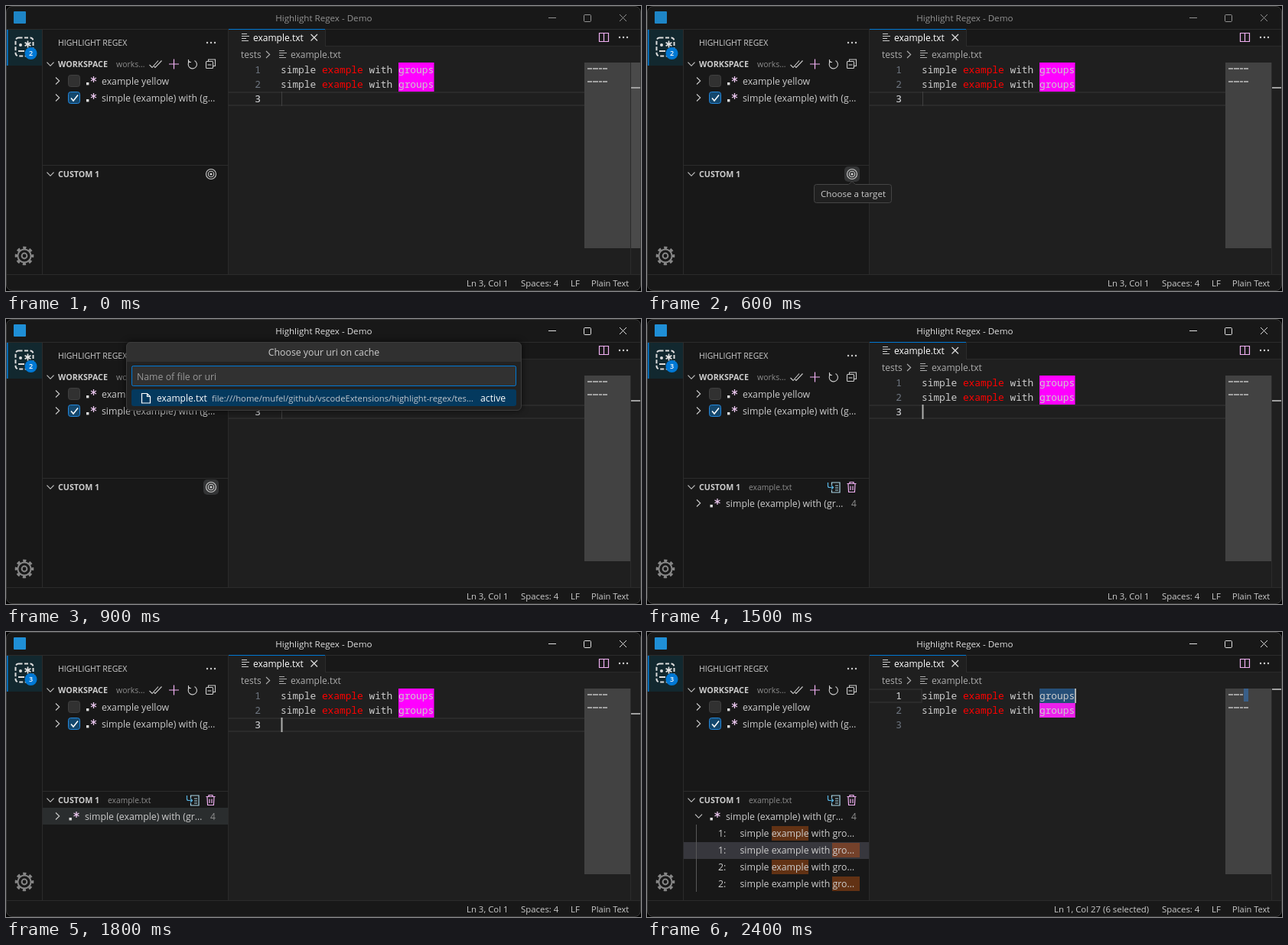
An HTML page that plays this animation: 830x373 px, repeating every 2.7 s.

```html
<!DOCTYPE html>
<html lang="en">
<head>
<meta charset="utf-8">
<title>Highlight Regex - Demo</title>
<style>
html, body { margin: 0; width: 100%; height: 100%; overflow: hidden; background: #000; }
svg { display: block; width: 830px; height: 373px; }
text { font: 12.3px "Open Sans", "Noto Sans", sans-serif; fill: #ccc; }
.head { font-size: 10.7px; font-weight: 700; }
.note { font-size: 10.5px; fill: #8c8c8c; }
.tab { font-size: 12px; }
.bar { font-size: 11.4px; }
.code text { font: 12.83px "Noto Sans Mono", "DejaVu Sans Mono", monospace; }
.code .num { fill: #6e7681; text-anchor: end; }
.code .now { fill: #ccc; text-anchor: end; }
.code tspan { fill: #f00; }
.white { fill: #fff; }
.line { fill: none; stroke: #ccc; stroke-width: 1.1; }
.edge { fill: none; stroke: #2b2b2b; }
.pink { fill: none; stroke: #f0b0f2; stroke-width: 1.2; }
.mark { fill: #623214; }
.map { fill: none; stroke: #a2a2a2; stroke-width: 2; stroke-dasharray: 6 1 7 1 4 1 6 1; }

/* vAB is visible from step A to step B; nine steps of 300 ms */
[class^=v] { visibility: hidden; animation: 2.7s step-end infinite; }
.v01 { animation-name: v01 } .v04 { animation-name: v04 } .v07 { animation-name: v07 }
.v13 { animation-name: v13 } .v22 { animation-name: v22 } .v33 { animation-name: v33 }
.v34 { animation-name: v34 } .v44 { animation-name: v44 } .v56 { animation-name: v56 }
.v58 { animation-name: v58 } .v66 { animation-name: v66 } .v77 { animation-name: v77 }
.v78 { animation-name: v78 } .v88 { animation-name: v88 }
@keyframes v01 { 0% { visibility: visible } 22.2222% { visibility: hidden } }
@keyframes v04 { 0% { visibility: visible } 55.5555% { visibility: hidden } }
@keyframes v07 { 0% { visibility: visible } 88.8888% { visibility: hidden } }
@keyframes v13 { 11.1111% { visibility: visible } 44.4444% { visibility: hidden } }
@keyframes v22 { 22.2222% { visibility: visible } 33.3333% { visibility: hidden } }
@keyframes v33 { 33.3333% { visibility: visible } 44.4444% { visibility: hidden } }
@keyframes v34 { 33.3333% { visibility: visible } 55.5555% { visibility: hidden } }
@keyframes v44 { 44.4444% { visibility: visible } 55.5555% { visibility: hidden } }
@keyframes v56 { 55.5555% { visibility: visible } 77.7777% { visibility: hidden } }
@keyframes v58 { 55.5555%, 100% { visibility: visible } }
@keyframes v66 { 66.6666% { visibility: visible } 77.7777% { visibility: hidden } }
@keyframes v77 { 77.7777% { visibility: visible } 88.8888% { visibility: hidden } }
@keyframes v78 { 77.7777%, 100% { visibility: visible } }
@keyframes v88 { 88.8888%, 100% { visibility: visible } }

.caption { color: #ddd; animation: focus 2.7s step-end infinite; }
.caption text { font-size: 11.6px; fill: currentColor; text-anchor: middle; }
@keyframes focus { 0% { color: #9d9d9d; opacity: .92 } 33.3333%, 100% { color: #e0e0e0; opacity: 1 } }
.dialog { filter: drop-shadow(0 0 4px #000a); }
</style>
</head>
<body>
<svg viewBox="0 0 830 373">
<defs>
  <path id="right" class="line" d="M-2.5-4.5 2.2 0-2.5 4.5"/>
  <path id="down" class="line" d="M-4.5-2.3 0 2.3 4.5-2.3"/>
  <g id="regex">
    <path fill="#ddd" d="M-7 2h3.4v3.4h-3.4z"/>
    <path d="M2.5-6v8M-1-4 6 0M-1 0 6-4" fill="none" stroke="#ecc8f0" stroke-width="1.3"/>
  </g>
  <path id="lines" class="line" d="M0 .5h7M0 3.5h10M0 6.5h6M0 9.5h9"/>
  <g id="dots" fill="#ccc"><circle cx="-5" r="1.2"/><circle r="1.2"/><circle cx="5" r="1.2"/></g>
</defs>

<!-- window -->
<rect x=".5" y=".5" width="829" height="372" rx="7.5" fill="#181818"/>
<path d="M291 52H829V351H291z" fill="#1f1f1f"/>
<path class="edge" d="M1 30.5H829M47.5 30V351M290.5 30V351M1 351.5H829M291 52.5H829M48 208.5H290"/>

<g class="caption">
  <rect x="10" y="7" width="16" height="16" rx="1" fill="#1f8fd6"/>
  <text x="415.3" y="20">Highlight Regex - Demo</text>
  <path d="M709 15.5h10M802 11l9 9M811 11l-9 9" fill="none" stroke="currentColor"/>
  <rect x="755.5" y="11.5" width="9" height="9" rx="1.2" fill="none" stroke="currentColor"/>
</g>

<!-- activity bar -->
<path d="M1 31H47V78H1z" fill="#12282f"/>
<path d="M1 31h1.6v47H1z" fill="#0078d4"/>
<rect x="12.5" y="41.5" width="23" height="24" rx="4" fill="none" stroke="#ddd" stroke-width="2" stroke-dasharray="5 2.5"/>
<path d="M28.5 45.500v9M24.600 47.700l7.800 4.500M24.600 52.200l7.800-4.500" fill="none" stroke="#e4e4e4" stroke-width="1.7"/>
<circle cx="19" cy="51" r="2" fill="#ddd"/>
<path d="M16 59h8" stroke="#ddd" stroke-width="2"/>
<circle cx="32.5" cy="62" r="8" fill="#0078d4"/>
<g style="text-anchor:middle">
  <text class="v04" x="32.500" y="65.300" style="font-size:9px;font-weight:600;fill:#fff">2</text>
  <text class="v58" x="32.500" y="65.300" style="font-size:9px;font-weight:600;fill:#fff">3</text>
</g>
<g fill="none" stroke="#868686" stroke-width="2" transform="translate(24 327)">
  <circle r="8.600"/>
  <circle r="10.600" stroke-width="3.400" stroke-dasharray="4.160" stroke-dashoffset="2.080"/>
  <circle r="3.400"/>
</g>

<!-- workspace section -->
<text x="68" y="52" style="font-size:10.5px">HIGHLIGHT REGEX</text>
<use href="#dots" x="268" y="48"/>
<use href="#down" x="58" y="76"/>
<text class="head" x="68" y="80">WORKSPACE</text>
<text class="note" x="144" y="80">works…</text>
<path class="line" d="M187.500 77l3.500 3.500 8-9M193.500 79l1.500 1.500 8.500-9"/>
<path class="pink" d="M219.500 69.500v13M213 76h13"/>
<path class="line" d="M240 72.200a5.600 5.600 0 1 0 6.500-.8M238.500 70v3.500h3.500M264.500 72.500v-2.500h9v8.500h-2.500"/>
<rect class="line" x="261.500" y="72.500" width="9" height="9" rx="1"/>
<path class="line" d="M263.500 77h5"/>

<use href="#right" x="67.500" y="98"/>
<rect x="81.500" y="90.500" width="15" height="15" rx="3" fill="#313131" stroke="#404040"/>
<use href="#regex" x="112" y="98"/>
<text x="125" y="102.600">example yellow</text>
<use href="#right" x="67.500" y="120"/>
<rect x="81.500" y="112.500" width="15" height="15" rx="3" fill="#14476d" stroke="#2488db"/>
<path d="M85 120.500l3 3.500 6-7.500" fill="none" stroke="#fff" stroke-width="1.500"/>
<use href="#regex" x="112" y="120"/>
<text x="125" y="124.600">simple (example) with (g…</text>

<!-- custom section -->
<use href="#down" x="58" y="220"/>
<text class="head" x="68" y="224">CUSTOM 1</text>
<rect class="v13" x="258" y="210" width="20" height="20" rx="5" fill="#343536"/>
<g class="v04">
  <circle class="line" cx="268" cy="220" r="6.500"/>
  <circle class="line" cx="268" cy="220" r="3.700"/>
  <circle cx="268" cy="220" r="1.600" fill="#ccc"/>
</g>
<g class="v58">
  <text class="note" x="133" y="224" style="font-size:10.3px">example.txt</text>
  <path d="M241.500 217.500v-3.500h10.500v13h-10.500v-3M246 218h4M246 221h4M246 224h4" fill="none" stroke="#a9d5e6" stroke-width="1.200"/>
  <path d="M236.500 214v4.500q0 2 2 2h5M241 218l2.500 2.500-2.500 2.500" fill="none" stroke="#58b5e4" stroke-width="1.200"/>
  <path class="pink" d="M261.500 215.500h12M265 215v-1.500h5v1.500M263 216l.6 10.500h7.800l.6-10.500M266 218.500v5.500M269 218.500v5.500"/>
</g>
<path class="v66" d="M48 230H290V252H48z" fill="#2a2d2e"/>
<rect class="v77" x="48.500" y="230.500" width="241" height="21" fill="#2e3133" stroke="#0078d4"/>
<g class="v58">
  <use href="#regex" x="89.500" y="241"/>
  <text x="103" y="245.600">simple (example) with (gr…</text>
  <text x="267" y="245.600" style="fill:#8f8f8f;font-size:12px">4</text>
</g>
<use class="v56" href="#right" x="67.500" y="241"/>
<g class="v77">
  <text class="white" x="103" y="245.600">simple (example) with (gr…</text>
  <text class="white" x="267" y="245.600" style="font-size:12px">4</text>
</g>
<g class="v78">
  <use href="#down" x="67.500" y="241"/>
  <path class="v88" d="M48 275H290V297H48z" fill="#37373d"/>
  <path d="M64.500 252V340" stroke="#585858"/>
  <path class="mark" d="M163 254h48v19h-48zM242 276h36v19h-36zM163 298h48v19h-48zM242 320h36v19h-36z"/>
  <path class="v88" d="M242 276h36v19h-36z" fill="#74412a"/>
  <text x="93" y="268.300">1:</text><text x="121.500" y="268.300">simple example with gro…</text>
  <text x="93" y="290.300">1:</text><text x="121.500" y="290.300">simple example with gro…</text>
  <text x="93" y="312.300">2:</text><text x="121.500" y="312.300">simple example with gro…</text>
  <text x="93" y="334.300">2:</text><text x="121.500" y="334.300">simple example with gro…</text>
</g>

<!-- tabs and breadcrumb -->
<path d="M291 30H417V53H291z" fill="#1f1f1f"/>
<path d="M291 30.500H417" stroke="#0078d4"/>
<path class="edge" d="M417.500 31V52"/>
<use href="#lines" x="308" y="36"/>
<text class="tab white" x="323" y="46">example.txt</text>
<path d="M398.500 37l8.500 8.500M407 37l-8.500 8.500" fill="none" stroke="#e0e0e0" stroke-width="1.200"/>
<path class="pink" d="M775.500 35.500h12v11h-12zM781.500 35.500v11"/>
<use href="#dots" x="807" y="41"/>
<g opacity=".82">
  <text class="tab" x="307" y="68">tests</text>
  <use href="#right" x="342.500" y="63.500"/>
  <use href="#lines" x="357" y="58"/>
  <text class="tab" x="372" y="68">example.txt</text>
</g>

<!-- editor -->
<g class="code">
  <g class="v07">
    <path d="M291 113H770V130H291" fill="none" stroke="#2b2b2b" stroke-width="2"/>
    <path d="M360.500 112v19" stroke="#404040"/>
  </g>
  <path class="v88" d="M291 75H359V92H291" fill="none" stroke="#2b2b2b" stroke-width="2"/>
  <path d="M513 74h46.500v38h-46.500z" fill="#f0f"/>
  <g class="v88">
    <path d="M513 74h46.500v19h-46.500z" fill="#264f78"/>
    <path d="M513 93h46.500v19h-46.500z" fill="#ec20ec"/>
  </g>
  <text class="num" x="333" y="88">1</text>
  <text class="num" x="333" y="107">2</text>
  <text class="num" x="333" y="126">3</text>
  <g class="v07"><text class="now" x="333" y="126">3</text></g>
  <g class="v88"><text class="now" x="333" y="88">1</text></g>
  <text x="359" y="88">simple <tspan>example</tspan> with groups</text>
  <text x="359" y="107">simple <tspan>example</tspan> with groups</text>
  <path class="v56" d="M359.500 112h2v19h-2z" fill="#aeafad"/>
  <path class="v88" d="M559 74h2v19h-2z" fill="#aeafad"/>
</g>

<!-- minimap and scrollbar -->
<path class="edge" d="M816.500 74V351"/>
<path d="M756 74h60v243h-60z" fill="#424242"/>
<path class="v01" d="M817 74h12v243h-12z" fill="#4a4a4a"/>
<path class="map" d="M760 82h26M760 99h26"/>
<path class="v88" d="M780 74h6v17h-6z" fill="#3a5f88"/>
<path class="v07" d="M817 106h12v2h-12z" fill="#a0a0a0"/>
<path class="v88" d="M817 74h12v2h-12z" fill="#a0a0a0"/>

<!-- status bar -->
<text class="v07 bar" x="602" y="367">Ln 3, Col 1</text>
<text class="v88 bar" x="532" y="367">Ln 1, Col 27 (6 selected)</text>
<text class="bar" x="673" y="367">Spaces: 4</text>
<text class="bar" x="738" y="367">LF</text>
<text class="bar" x="765" y="367" style="font-size:11.1px">Plain Text</text>

<!-- tooltip -->
<g class="v22">
  <path d="M221.500 233.500h42l4.500-4 4.500 4h44q3 0 3 3v18q0 3-3 3h-95q-3 0-3-3v-18q0-3 3-3z" fill="#202020" stroke="#454545"/>
  <text x="227" y="250" style="font-size:11.6px">Choose a target</text>
</g>

<!-- quick pick -->
<g class="v34">
  <rect class="dialog" x="157" y="30" width="517" height="90" rx="6" fill="#222"/>
  <path d="M157.500 56V36q0-5.500 5.500-5.500h505q5.500 0 5.500 5.500v20z" fill="#303030"/>
  <rect x="157.500" y="30.500" width="516" height="89" rx="5.500" fill="none" stroke="#3c3c3c"/>
  <text x="415.500" y="48" text-anchor="middle">Choose your uri on cache</text>
  <rect x="164.500" y="61.500" width="502" height="26" rx="2" fill="#313131" stroke="#3c3c3c"/>
  <rect class="v33" x="164.500" y="61.500" width="502" height="26" rx="2" fill="none" stroke="#0078d4"/>
  <text x="171" y="80" style="fill:#989898">Name of file or uri</text>
  <rect x="164" y="92" width="503" height="22" rx="3" fill="#04395e"/>
  <rect class="v44" x="164.500" y="92.500" width="502" height="21" rx="3" fill="none" stroke="#0078d4"/>
  <path d="M177.500 97.500h7l4 4v8.500h-11zM184.500 97.500v4h4" fill="none" stroke="#fff" stroke-width="1.200"/>
  <text class="tab white" x="197" y="108">example.txt</text>
  <text x="269" y="108" style="font-size:11.25px;fill:#c0c6cc">file:///home/mufel/github/vscodeExtensions/highlight-regex/tes…</text>
  <text class="white" x="620" y="108">active</text>
</g>

<rect x=".5" y=".5" width="829" height="372" rx="7.500" fill="none" stroke="#3a3a3a"/>
</svg>
</body>
</html>
```
